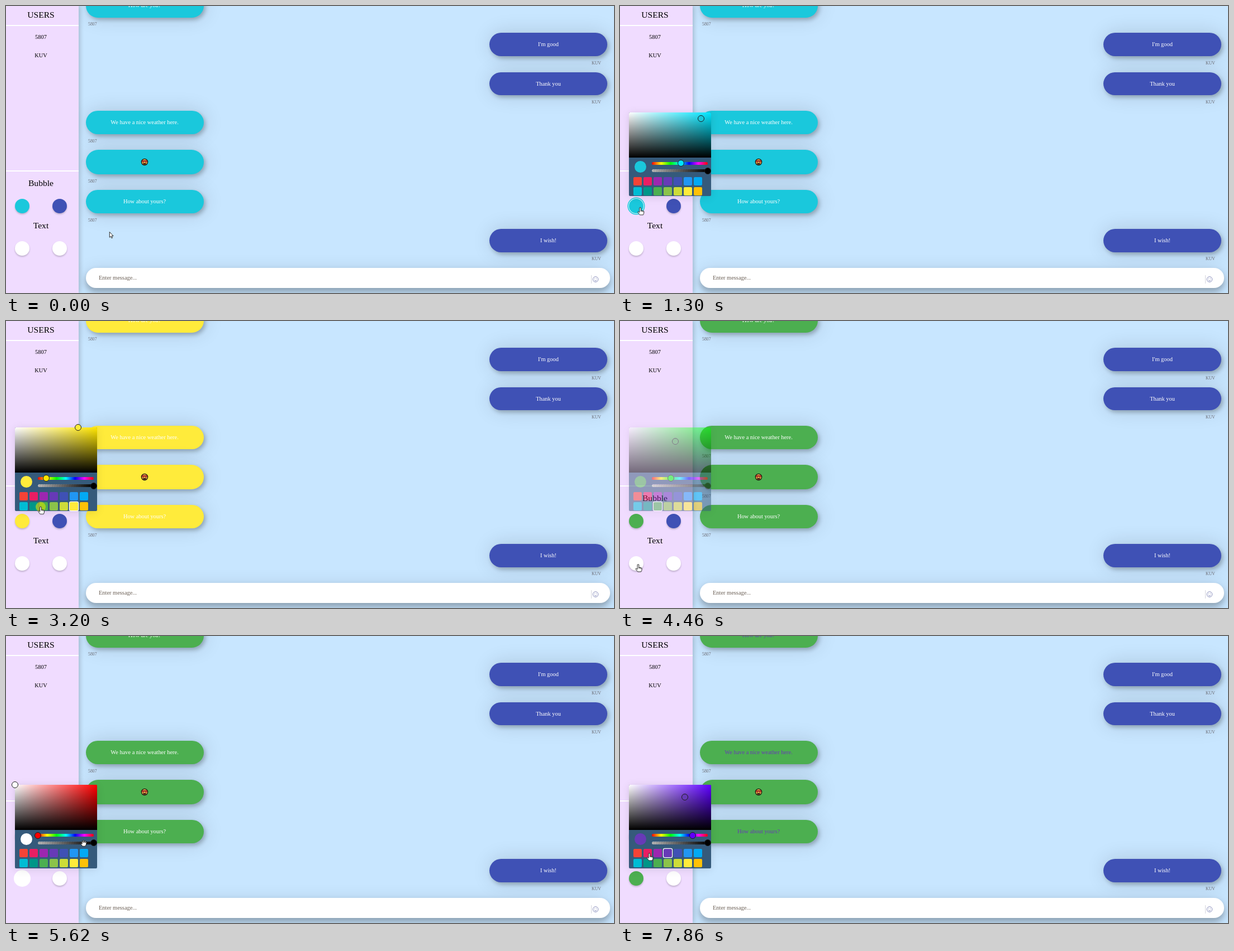
Recreate the animation shown at these times as an HTML page. Size 1088 px wide and 515 px high, loop 8 s.

```html
<!DOCTYPE html>
<html lang="en">
<head>
<meta charset="utf-8">
<title>Chat colours</title>
<style>
:root {
  --cyan: #1ac8dc; --yellow: #ffeb3b; --green: #4caf50; --purple: #673ab7; --blue: #3f51b5;
  --drop: 0 2px 3px rgba(0,0,0,.2);
}
html, body { margin: 0; width: 100%; height: 100%; overflow: hidden; }
body {
  position: relative; background: #c8e6ff; color: #000;
  font: 10.4px/12px "Liberation Serif", "Times New Roman", serif;
}
div, i, svg { position: absolute; box-sizing: border-box; }

/* messages */
.msg {
  width: 211px; border-radius: 22px; color: #fff; text-align: center;
  box-shadow: 3px 4px 7px rgba(0,0,0,.24), 2px 0 36px rgba(0,0,0,.14);
}
.msg.l { left: 142.5px; background: var(--cyan);
  animation: fill 8s step-end infinite, ink 8s step-end infinite; }
.msg.r { left: 865px; background: var(--blue); }
.tag { font-size: 7.8px; color: #6c6c74; }
.tag.l { left: 147px; }
.tag.r { right: 23px; }
@keyframes fill {
  0% { background: var(--cyan); }
  21.25% { background: var(--yellow); }
  41.125%, 100% { background: var(--green); }
}
@keyframes ink {
  0% { color: #fff; }
  83.5%, 100% { color: var(--purple); }
}
.entry {
  left: 142.5px; top: 470px; width: 938.5px; height: 36px; border-radius: 18px;
  background: #fff; color: #6b5f55; line-height: 36px; padding-left: 23.5px;
  box-shadow: 0 7px 12px rgba(0,0,0,.26), 0 2px 30px rgba(0,0,0,.1);
}

/* sidebar */
.side { left: 0; top: 0; width: 130px; height: 100%; background: #f0dcff;
  box-shadow: 3px 0 7px rgba(0,0,0,.17); }
.side div { left: 0; width: 125px; text-align: center; }
.side .head { font-size: 15.6px; line-height: 20px; }
.side .rule { width: 130px; height: 2px; background: #fff; }
.dot { width: 26px; height: 26px; border-radius: 50%; background: #fff; box-shadow: var(--drop); }
.dot.a { animation: dotA 8s linear infinite; }
.dot.b { animation: dotB 8s linear infinite; }
@keyframes dotA {
  0%, 10.5% { background: #1ac8dc; box-shadow: 0 0 0 0 #fff0, 0 2px 3px 0 rgba(0,0,0,.2); }
  14.25%, 21.25% { background: #1ac8dc; box-shadow: 0 0 0 1px #ffffffd9, 0 0 0 2.5px #1ac8dc; }
  23.75%, 41.125% { background: #ffeb3b; box-shadow: 0 0 0 0 #fff0, 0 2px 3px 0 rgba(0,0,0,.2); }
  43.5%, 100% { background: #4caf50; box-shadow: 0 0 0 0 #fff0, 0 2px 3px 0 rgba(0,0,0,.2); }
}
@keyframes dotB {
  0%, 57.5% { background: #fff; box-shadow: 0 0 0 0 #fff0, 0 2px 3px 0 rgba(0,0,0,.2); }
  61.25%, 83.5% { background: #fff; box-shadow: 0 0 0 1px #ffffffd9, 0 0 0 2px #fff; }
  86.5%, 100% { background: #4caf50; box-shadow: 0 0 0 0 #fff0, 0 2px 3px 0 rgba(0,0,0,.2); }
}

/* colour picker */
.picker { left: 16px; width: 146.5px; height: 150px; border-radius: 2px; background: #355a7b;
  box-shadow: 0 2px 16px rgba(0,0,0,.1), 0 0 10px rgba(0,0,0,.03); opacity: 0; }
.picker.a { top: 191px; animation: showA 8s infinite, pickA 8s step-end infinite; }
.picker.b { top: 266.5px; animation: showB 8s infinite, pickB 8s step-end infinite; }
.area { width: 100%; height: 81px; border-radius: 2px 2px 0 0;
  background: linear-gradient(to top, #000, transparent),
    linear-gradient(to left, hsl(var(--h) 100% 50%), #fff); }
.knob { width: 12px; height: 12px; margin: -6px; border-radius: 50%; border: 1.5px solid #1c1c1c; }
.knob.sv { left: calc(var(--s) * 146.5px); top: calc((1 - var(--v)) * 81px); background: var(--c); }
.knob.hue { left: calc(41px + var(--h) / 360 * 100px); top: 91px; background: hsl(var(--h) 100% 50%); }
.knob.alpha { left: 140.5px; top: 104.5px; background: #000; }
.bar { left: 41px; width: 100px; height: 5px; border-radius: 3px; }
.bar.hue { top: 88.5px; background: linear-gradient(to right,
  red, #ff0, lime, cyan, blue, magenta, red); }
.bar.alpha { top: 102px; background: linear-gradient(to right, transparent, #000),
  repeating-conic-gradient(#fff 0 25%, #777 0 50%) 0 0 / 2.6px 2.6px; }
.now { left: 9.5px; top: 87px; width: 21px; height: 21px; border-radius: 50%; background: var(--c); }
.chip { width: 15px; height: 15px; border-radius: 2px; }
.ring { left: calc(7.5px + var(--col) * 18px); top: calc(115.5px + var(--row) * 18px);
  width: 15px; height: 15px; border-radius: 2px; opacity: var(--on);
  box-shadow: 0 0 0 1.2px #fff; }
@keyframes showA {
  0%, 10.5% { opacity: 0; }
  14.25%, 54.69% { opacity: 1; }
  58.44%, 100% { opacity: 0; }
}
@keyframes showB {
  0%, 57.5% { opacity: 0; }
  61.25%, 100% { opacity: 1; }
}
@keyframes pickA {
  0% { --c: #1ac8dc; --h: 186; --s: .88; --v: .863; --col: 0; --row: 0; --on: 0; }
  21.25% { --c: #ffeb3b; --h: 54; --s: .769; --v: 1; --col: 5; --row: 1; --on: 1; }
  41.125%, 100% { --c: #4caf50; --h: 122; --s: .566; --v: .686; --col: 2; --row: 1; --on: 1; }
}
@keyframes pickB {
  0% { --c: #fff; --h: 0; --s: 0; --v: 1; --col: 0; --row: 0; --on: 0; }
  83.5%, 100% { --c: #673ab7; --h: 262; --s: .683; --v: .718; --col: 3; --row: 0; --on: 1; }
}

/* pointer */
.pointer { left: 0; top: 0; animation: move 8s ease-in-out infinite; }
.pointer svg { left: -12px; top: -12px; overflow: visible; }
.pointer path { fill: #fff; stroke: #111; stroke-width: .9; stroke-linejoin: round; }
.arrow { animation: arrow 8s step-end infinite; }
.hand { animation: hand 8s step-end infinite; }
.grab { animation: grab 8s step-end infinite; }
.click { left: -9px; top: -9px; width: 18px; height: 18px; border-radius: 50%;
  background: rgba(222,228,0,.6); animation: click 8s step-end infinite; }
@keyframes move {
  0%, 4.375% { transform: translate(185px, 405px); }
  9.6%, 15.375% { transform: translate(29.5px, 364px); }
  20%, 33.125% { transform: translate(119px, 334px); }
  38.25%, 47% { transform: translate(62px, 333.5px); }
  54.25%, 61.25% { transform: translate(32.5px, 437px); }
  63.875%, 65.625% { transform: translate(44px, 386px); }
  70.25%, 72% { transform: translate(139px, 372px); }
  81.375%, 94.25% { transform: translate(86px, 386px); }
  98.25%, 100% { transform: translate(52.5px, 390px); }
}
@keyframes arrow {
  0% { opacity: 1; }
  9% { opacity: 0; }
  16.6% { opacity: 1; }
  18.8% { opacity: 0; }
  48.6% { opacity: 1; }
  53% { opacity: 0; }
  62% { opacity: 1; }
  63.2% { opacity: 0; }
  67% { opacity: 1; }
  69.4% { opacity: 0; }
  73.5% { opacity: 1; }
  79%, 100% { opacity: 0; }
}
@keyframes hand {
  0% { opacity: 0; }
  9% { opacity: 1; }
  16.6% { opacity: 0; }
  18.8% { opacity: 1; }
  48.6% { opacity: 0; }
  53% { opacity: 1; }
  62% { opacity: 0; }
  63.2% { opacity: 1; }
  67% { opacity: 0; }
  79%, 100% { opacity: 1; }
}
@keyframes grab {
  0% { opacity: 0; }
  69.4% { opacity: 1; }
  73.5%, 100% { opacity: 0; }
}
@keyframes click {
  0% { opacity: 0; }
  9.6% { opacity: 1; }
  10.75% { opacity: 0; }
  20.2% { opacity: 1; }
  21.25% { opacity: 0; }
  40% { opacity: 1; }
  41.125% { opacity: 0; }
  54.4% { opacity: 1; }
  55.6% { opacity: 0; }
  82.125% { opacity: 1; }
  83.5%, 100% { opacity: 0; }
}
</style>
</head>
<body>
<div id="chat"></div>
<svg style="left:241px;top:273px" width="14" height="14" viewBox="-7 -7 14 14">
  <circle r="5.6" fill="#f4ae4c" stroke="#15110c" stroke-width="1.3"/>
  <path d="M-2.5 1L-4.6-1.2A1.2 1.2 0 0 1-2.5-2.6 1.2 1.2 0 0 1-.4-1.2zM2.5 1L.4-1.2A1.2 1.2 0 0 1 2.5-2.6 1.2 1.2 0 0 1 4.6-1.2z" fill="#c8302c" stroke="#3a1512" stroke-width=".5"/>
  <path d="M-3 1.8H3A3 3 0 0 1-3 1.8z" fill="#3a2418"/>
</svg>
<div class="entry">Enter message...</div>
<svg style="left:1045px;top:480px" width="18" height="20" fill="none" stroke="#8b90bd">
  <path d="M2.5 3V18" stroke="#d5d5dd"/>
  <circle cx="10" cy="10.5" r="4.8"/>
  <path d="M7.6 11.5Q10 14.8 12.4 11.5M8.3 8.3V9.6M11.7 8.3V9.6"/>
</svg>

<div class="side">
  <div class="head" style="top:6px">USERS</div>
  <div class="rule" style="top:34px"></div>
  <div style="top:50px">5807</div>
  <div style="top:83px">KUV</div>
  <div class="rule" style="top:295px"></div>
  <div class="head" style="top:308px">Bubble</div>
  <div class="head" style="top:384px">Text</div>
  <i class="dot a" style="left:16px;top:346px"></i>
  <i class="dot" style="left:83px;top:346px;background:var(--blue)"></i>
  <i class="dot b" style="left:16px;top:421.5px"></i>
  <i class="dot" style="left:83px;top:421.5px"></i>
</div>

<div class="picker a"></div>
<div class="picker b"></div>

<div class="pointer">
  <i class="click"></i>
  <svg class="arrow" width="24" height="24" viewBox="-12 -12 24 24">
    <path d="M.3.5V10.2L2.5 8.2 4 11.6 5.6 10.9 4.1 7.6H7.1z"/>
  </svg>
  <svg class="hand" width="24" height="24" viewBox="-12 -12 24 24">
    <path d="M-1.3 1a1.3 1.3 0 0 1 2.6 0V5l4 .8q1.5.5 1.4 2.1l-.5 2.9-1 2.2H-.8L-4.2 8.6q-.8-1.7.9-1.5L-1.3 8.6z"/>
    <path d="M1.3 5V7M3.3 5.5V7.3M5.2 6V7.6" stroke-width=".6"/>
  </svg>
  <svg class="grab" width="24" height="24" viewBox="-12 -12 24 24">
    <path d="M-2.2 5.2L-5 1.2q-.4-1.4 1-1.2l1.3 1.2-.9-4q0-1.4 1.3-1l1 2.6V-4.6q.8-1.3 1.6 0L.9-1.4 1.9-4.3q1.1-1 1.6.3L3-.9 4.1-2.6q1.1-.5 1.2.6L4.2 2.8 2.9 5.2z"/>
  </svg>
</div>

<script>
const add = (parent, cls, style, text = '') => {
  const el = document.createElement('div');
  el.className = cls;
  el.style.cssText = style;
  el.textContent = text;
  parent.append(el);
};

const names = { l: '5807', r: 'KUV' };
const messages = [
  ['l', -22, 42.5, 'How are you?'],
  ['r', 48, 42, "I'm good"],
  ['r', 118.5, 41.5, 'Thank you'],
  ['l', 188, 42, 'We have a nice weather here.'],
  ['l', 258, 44, ''],
  ['l', 330, 42, 'How about yours?'],
  ['r', 399.5, 42, 'I wish!'],
];
for (const [side, top, height, text] of messages) {
  add(chat, 'msg ' + side, `top:${top}px;height:${height}px;line-height:${height}px`, text);
  add(chat, 'tag ' + side, `top:${top + height + 6.5}px`, names[side]);
}
chat.style.cssText = 'inset:0';

const chips = ('f44336 e91e63 9c27b0 673ab7 3f51b5 2196f3 03a9f4 ' +
  '00bcd4 009688 4caf50 8bc34a cddc39 ffeb3b ffc107').split(' ');
const parts = ['area', 'bar hue', 'bar alpha', 'now', 'knob sv', 'knob hue', 'knob alpha'];
for (const picker of document.querySelectorAll('.picker')) {
  parts.forEach(cls => add(picker, cls, ''));
  chips.forEach((hex, i) => add(picker, 'chip',
    `left:${7.5 + i % 7 * 18}px;top:${115.5 + (i > 6) * 18}px;background:#${hex}`));
  add(picker, 'ring', '');
}
</script>
</body>
</html>
```
